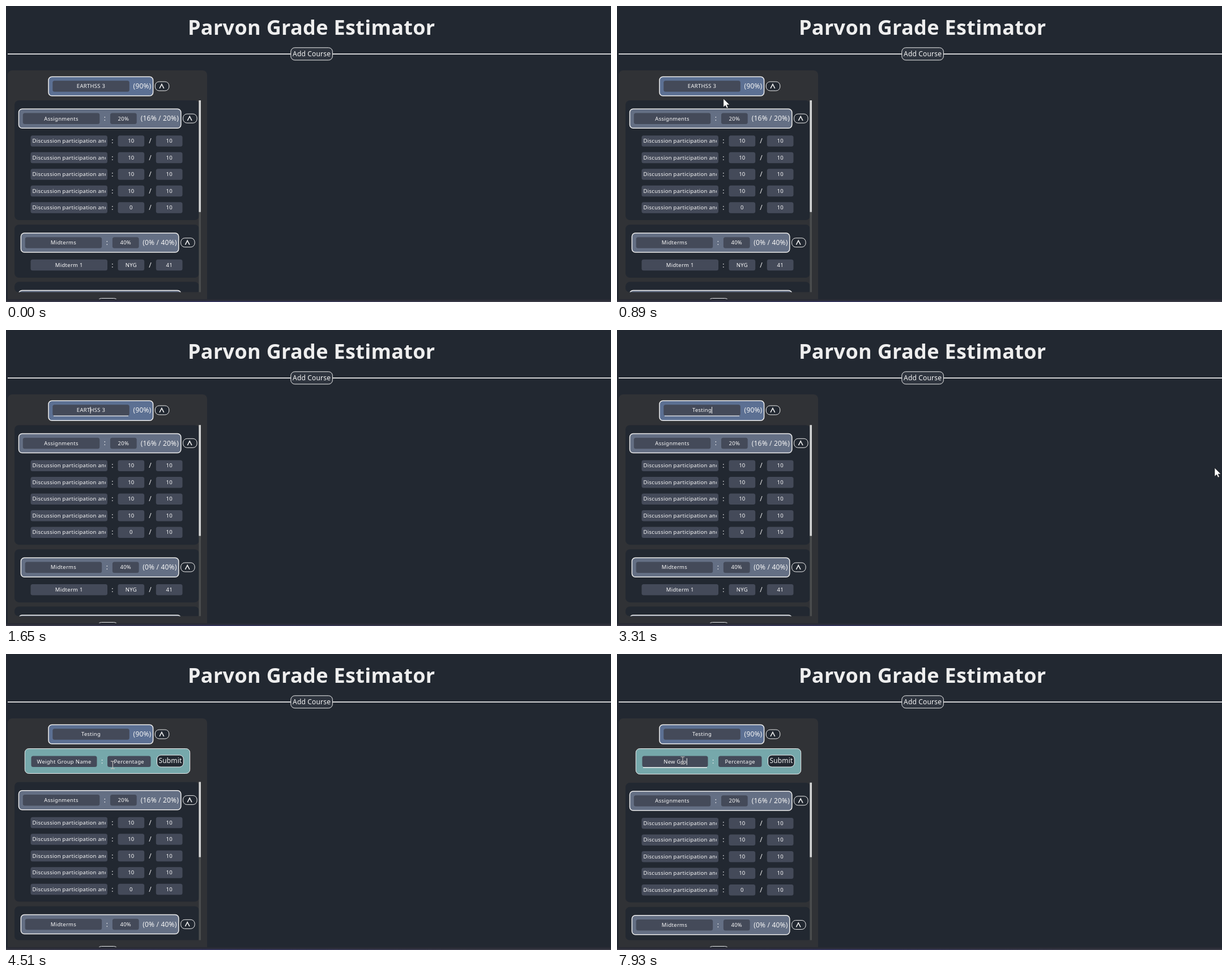
An HTML page for the animation above (8000 ms loop, 1068 by 524 pixels).

```html
<!DOCTYPE html>
<html lang="en">
<head>
<meta charset="utf-8">
<title>Grade Estimator</title>
<style>
  html, body { margin: 0; width: 100%; height: 100%; overflow: hidden; background: #222831; }
  svg { display: block; width: 100vw; height: 100vh; }
  text { font-family: "Noto Sans", "Open Sans", sans-serif; fill: #eee; text-anchor: middle; white-space: pre; }
  .small { font-size: 9.5px; letter-spacing: .27px; fill: #fafafa; }
  .mid { font-size: 12px; letter-spacing: .17px; fill: #f4f4f4; }
  .title { font-size: 36px; font-weight: 700; letter-spacing: .33px; }
  .left { text-anchor: start; }
  .outline { stroke: #eee; stroke-width: 1.5; }
  .thin { stroke: #eee; stroke-width: 1; }
</style>
</head>
<body>
<svg id="stage" viewBox="0 0 1068 524" preserveAspectRatio="none"></svg>
<script>
const LOOP = 8000;
const BG = '#222831';
const FOCUS_GROWTH = 1.2;
const FORM_HEIGHT = 59.5;
const BLINK = 530;

const rect = (x, y, w, h, r, fill, extra = '') =>
  `<rect x="${x}" y="${y}" width="${w}" height="${h}" rx="${r}" fill="${fill}" ${extra}/>`;
const text = (x, y, s, cls = 'small', extra = '') =>
  `<text x="${x}" y="${y}" class="${cls}" ${extra}>${s}</text>`;
const field = (x, cy, w, s, id = '') =>
  rect(x, cy - 9.7, w, 19.4, 3.5, '#444a59') + text(x + w / 2, cy + 3.2, s, 'small', id && `id="${id}"`);
const toggle = (x, cy) =>
  rect(x, cy - 8, 24.5, 16, 7, BG, 'class="thin"') +
  `<path d="M${x + 7.8} ${cy + 3.8}l3.8 -7.4 3.8 7.4" fill="none" stroke="#eee" stroke-width="1.6"/>`;

function group(x, w, cy, name, weight, total) {
  return rect(x, cy - 17, w, 34, 6, '#646f84', 'class="outline"') +
    field(x + 7.3, cy, 135.5, name) + text(x + 152, cy + 4, ':', 'mid') +
    field(x + 161.5, cy, 46.7, weight) +
    text(x + (w + 211.5) / 2, cy + 4.1, total, 'mid') + toggle(x + w + 3.8, cy - .2);
}

function row(cy, name, score, max) {
  const clipped = name.length > 20;
  const label = clipped
    ? rect(43.5, cy - 9.7, 135.5, 19.4, 3.5, '#444a59') +
      `<g clip-path="url(#nameClip)">${text(46.6, cy + 3.2, name, 'small left')}</g>`
    : field(43.5, cy, 135.5, name);
  return label + text(188, cy + 4, ':', 'mid') + field(197.5, cy, 46.7, score) +
    text(254.5, cy + 4.2, '/', 'mid') + field(264.8, cy, 46.7, max);
}

function list() {
  let out = rect(15, 167, 326, 212, 8, BG) + group(22.5, 286.3, 199.3, 'Assignments', '20%', '(16% / 20%)');
  for (let i = 0; i < 5; i++)
    out += row(239 + 29.5 * i, 'Discussion participation and', i < 4 ? '10' : '0', '10');
  return out +
    rect(15, 387, 326, 94, 8, BG) + group(26.4, 278.4, 419, 'Midterms', '40%', '(0% / 40%)') +
    row(458.5, 'Midterm 1', 'NYG', '41') +
    rect(15, 488.3, 326, 60, 8, BG) + rect(22.5, 503.5, 286.3, 34, 6, '#646f84', 'class="outline"');
}

const stage = document.getElementById('stage');
stage.innerHTML = `
  <defs>
    <clipPath id="nameClip"><rect x="46" y="160" width="130" height="400"/></clipPath>
    <clipPath id="listClip"><rect id="view" x="15" width="330" rx="7"/></clipPath>
    <clipPath id="panelClip"><rect x="0" y="0" width="1068" height="519"/></clipPath>
    <linearGradient id="edge">
      <stop offset="0" stop-color="#3c3c47"/>
      <stop offset=".35" stop-color="#34345a"/>
      <stop offset=".8" stop-color="#3c3c47"/>
    </linearGradient>
  </defs>
  ${rect(0, 0, 1068, 524, 0, BG)}
  ${text(539.2, 51, 'Parvon Grade Estimator', 'title')}
  ${rect(3, 84.1, 1065, 1.7, 0, '#eee')}
  ${rect(502.8, 73.8, 73.6, 22, 7, '#2e343e', 'class="thin"')}
  ${text(539.6, 89.2, 'Add Course', 'mid')}
  <g clip-path="url(#panelClip)">
    ${rect(3, 114, 352, 420, 8, '#303236')}
    ${rect(161.5, 517.5, 36, 20, 7, BG, 'class="thin"')}
  </g>
  <rect id="course" x="75" y="125.3" width="184.6" rx="6" fill="#5c7093" class="outline"/>
  ${field(82.3, 142, 135.5, '', 'courseName')}
  <path id="courseLine" d="M84 152.2H216" stroke="#eee" stroke-width="1.3"/>
  ${text(240.5, 146, '(90%)', 'mid')}
  ${toggle(263.3, 142)}
  <g id="form">
    <rect id="formBox" x="33.3" y="167.5" width="291.4" rx="7" fill="#76a8ab" class="thin"/>
    ${field(44.5, 190.3, 116, '', 'groupName')}
    <path id="formLine" d="M46 201H159" stroke="#eee" stroke-width="1.3"/>
    ${text(169.7, 194, ':', 'mid')}
    ${field(179, 190.3, 76.5, 'Percentage')}
    ${rect(266.5, 179, 46.8, 21, 7, BG, 'class="thin"')}
    ${text(290, 193.4, 'Submit', 'mid')}
  </g>
  <g clip-path="url(#listClip)"><g id="list">${list()}</g></g>
  <rect id="track" x="340.4" width="3.6" fill="#4a4c4d"/>
  <rect id="thumb" x="340.4" width="3.6" fill="#d2d3d3"/>
  ${rect(0, 519, 1068, 5, 0, '#292b35')}
  ${rect(0, 522, 1068, 2, 0, 'url(#edge)')}
  <rect id="caret" width="1" height="12" fill="#eee"/>
  <path id="arrow" d="M0 0V15.2L3.6 12 6 17 8.4 16 6.1 11H11Z" fill="#fff" stroke="#111" stroke-width=".6"/>
  <path id="beam" d="M-3.5 -6.5H-1L0 -5.5 1 -6.5H3.5M0 -5.5V5.5M-3.5 6.5H-1L0 5.5 1 6.5H3.5" fill="none" stroke="#c4c2bf" stroke-width="1.1"/>`;

const el = {};
stage.querySelectorAll('[id]').forEach(n => el[n.id] = n);
const set = (n, attrs) => { for (const k in attrs) n.setAttribute(k, attrs[k]); };
const show = (n, on) => set(n, { visibility: on ? 'visible' : 'hidden' });

// [time, x, y] of the mouse
const path = [
  [70, 1027, 507], [480, 520, 330], [890, 188, 164], [1120, 150, 142], [1320, 150, 142],
  [1580, 489, 205], [1850, 1055, 244], [3830, 1055, 244], [4100, 240, 146], [4300, 235, 148],
  [4510, 188.6, 196.4], [4920, 116, 188.5], [8000, 116, 188.5]
];
const courseTyping = [[0, 'EARTHSS 3'], [1980, 'T'], [2110, 'Te'], [2440, 'Tes'], [2970, 'Test'], [3100, 'Testin'], [3310, 'Testing']];
const groupTyping = [[0, 'Weight Group Name'], [6180, 'N'], [6450, 'Ne'], [6980, 'New'], [7270, 'New '], [7600, 'New G'], [7800, 'New Gr'], [7930, 'New Gro']];
const FOCUS_COURSE = 1320, BLUR_COURSE = 4100, OPEN_FORM = 4300, FOCUS_FORM = 5120;

const latest = (keys, t) => keys.filter(k => k[0] <= t).pop();

function mouseAt(t) {
  const i = path.findIndex(p => p[0] > t);
  const [t0, x0, y0] = path[i - 1], [t1, x1, y1] = path[i];
  const k = (t - t0) / (t1 - t0);
  return [x0 + (x1 - x0) * k, y0 + (y1 - y0) * k];
}

function drawMouse(t) {
  const visible = t >= 70 && (t < 1650 || t >= 1850);
  const [x, y] = visible ? mouseAt(t) : [0, 0];
  const inside = (l, r, top, bottom) => x > l && x < r && y > top && y < bottom;
  const overField = inside(82, 218, 132, 152) ||
    t >= OPEN_FORM && (inside(44, 161, 180, 201) || inside(179, 256, 180, 201));
  show(el.arrow, visible && !overField);
  show(el.beam, visible && overField);
  set(overField ? el.beam : el.arrow, { transform: `translate(${x} ${y})` });
}

function drawCaret(t, node, focusTime, key, typed) {
  const since = t - Math.max(focusTime, key[0]);
  show(el.caret, since % (2 * BLINK) < BLINK);
  const start = node.getStartPositionOfChar(0).x;
  set(el.caret, { x: start + node.getSubStringLength(0, typed), y: node === el.courseName ? 136 : 184.5 });
}

function draw(t) {
  const courseKey = latest(courseTyping, t), groupKey = latest(groupTyping, t);
  const courseFocus = t >= FOCUS_COURSE && t < BLUR_COURSE;
  const open = t >= OPEN_FORM, formFocus = t >= FOCUS_FORM;
  el.courseName.textContent = courseKey[1];
  el.groupName.textContent = groupKey[1];

  const grow = courseFocus || formFocus ? FOCUS_GROWTH : 0;
  const shift = grow + (open ? FORM_HEIGHT : 0);
  const top = 167 + shift, height = 506.5 - top;
  set(el.course, { height: courseFocus ? 34.9 : 33.7 });
  set(el.formBox, { height: formFocus ? 45.2 : 44 });
  set(el.list, { transform: `translate(0 ${shift})` });
  set(el.view, { y: top, height });
  set(el.track, { y: top, height });
  set(el.thumb, { y: top, height: height * height / (open ? 589 : 583) });
  show(el.courseLine, courseFocus);
  show(el.form, open);
  show(el.formLine, open && formFocus);

  if (courseFocus) drawCaret(t, el.courseName, FOCUS_COURSE, courseKey, courseKey[0] ? courseKey[1].length : 4);
  else if (formFocus && groupKey[0]) drawCaret(t, el.groupName, FOCUS_FORM, groupKey, groupKey[1].length);
  else {
    show(el.caret, formFocus && t < FOCUS_FORM + BLINK);
    set(el.caret, { x: 102, y: 184.5 });
  }
  drawMouse(t);
}

const begin = performance.now();
function tick() {
  draw((performance.now() - begin) % LOOP);
  requestAnimationFrame(tick);
}
tick();
</script>
</body>
</html>
```
